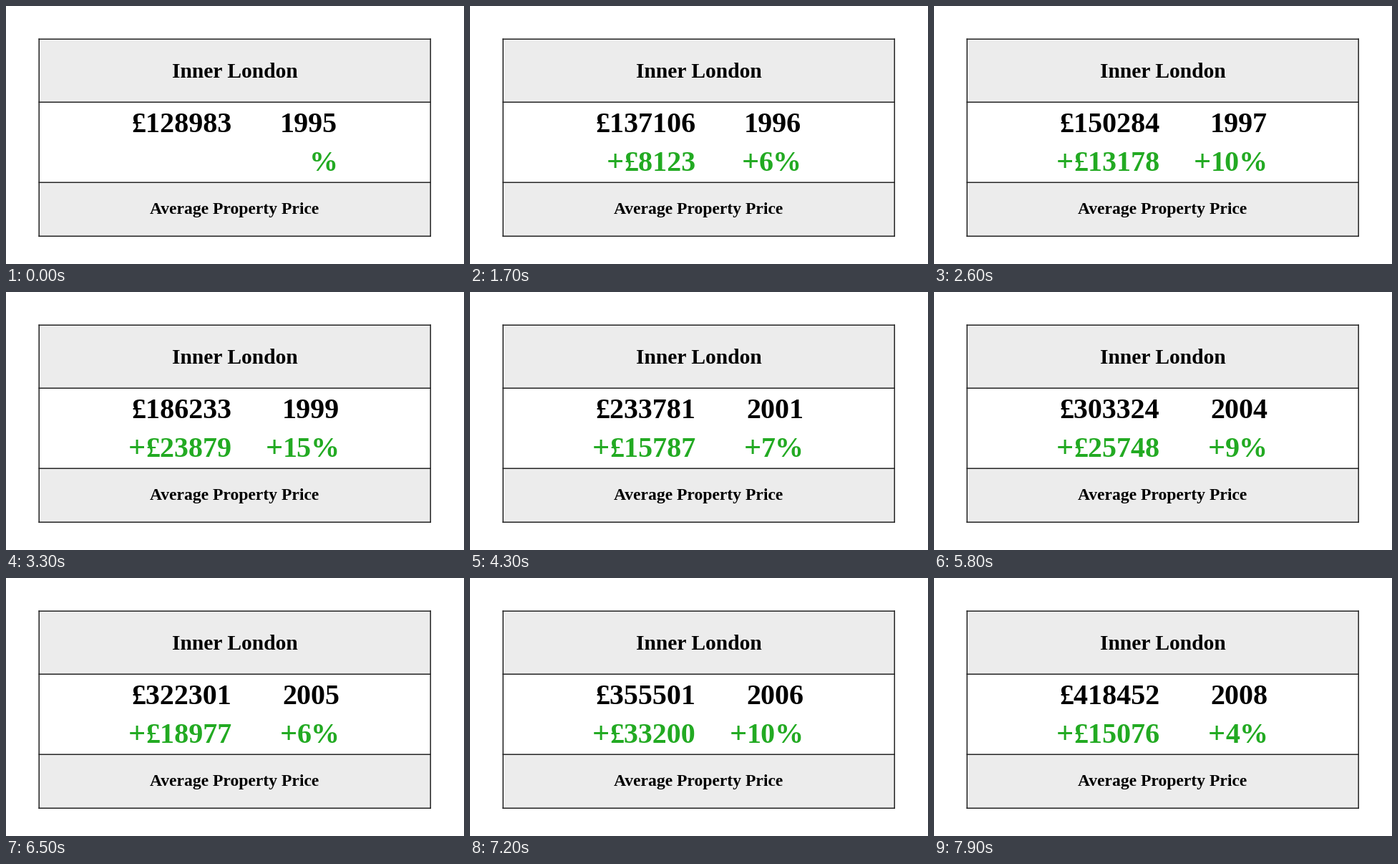
These frames come from a looping animation (640 by 360 pixels, 8000 ms). A matplotlib script:

```python
import matplotlib.pyplot as plt
from matplotlib.animation import FuncAnimation
from matplotlib.patches import Rectangle

W, H = 640, 360
STEP = 100
FRAMES = 80
FIRST_YEAR = 1995
PRICES = [128983, 137106, 150284, 162354, 186233, 217994, 233781,
          259046, 277576, 303324, 322301, 355501, 403376, 418452]
# Time in ms at which each year appears
STARTS = [0, 1700, 2200] + list(range(2800, 7801, 500))

INK, LINE, SHADE, GREEN = "black", "#222222", "#ececec", "#22aa22"
BIG = 40
PLUS_SIZE, PLUS_STEP = 42.5, 24
ROW1, ROW2 = 176, 230
PRICE_RIGHT = 315

plt.rcParams["font.family"] = "Liberation Serif"
plt.rcParams["font.weight"] = "bold"

fig = plt.figure(figsize=(W / 72, H / 72), dpi=72, facecolor="white")
ax = fig.add_axes([0, 0, 1, 1])
ax.set_xlim(0, W)
ax.set_ylim(H, 0)
ax.axis("off")

LEFT, RIGHT = 46.2, 593.2
ROWS = [46.2, 134.2, 246.2, 321.2]
for top, bottom, fill in zip(ROWS, ROWS[1:], (SHADE, "white", SHADE)):
    ax.add_patch(Rectangle((LEFT, top), RIGHT - LEFT, bottom - top,
                           facecolor=fill, edgecolor="none", snap=False))
for y in ROWS:
    ax.plot([LEFT, RIGHT], [y, y], color=LINE, lw=1.5, snap=False,
            solid_capstyle="projecting")
for x in (LEFT, RIGHT):
    ax.plot([x, x], [ROWS[0], ROWS[-1]], color=LINE, lw=1.5, snap=False)

ax.text(320.3, 100, "Inner London", size=29.5, ha="center", color=INK)
ax.text(319.2, 290, "Average Property Price", size=23.6, ha="center",
        color=INK)


def label(y, color, size=BIG):
    return ax.text(0, y, "", size=size, color=color)


price, year = label(ROW1, INK), label(ROW1, INK)
gain, gain_plus = label(ROW2, GREEN), label(ROW2, GREEN, PLUS_SIZE)
rate, rate_plus = label(ROW2, GREEN), label(ROW2, GREEN, PLUS_SIZE)
artists = [price, year, gain, gain_plus, rate, rate_plus]


def advance(text):
    """Width in pixels: digits are half an em, the percent sign a full em."""
    return sum(BIG if c == "%" else BIG / 2 for c in text)


def put(item, text, right, plus=None):
    left = right - advance(text)
    item.set_text(text)
    item.set_x(left)
    if plus:
        plus.set_text("+" if len(text) > 1 else "")
        plus.set_x(left - PLUS_STEP)


def draw(frame):
    t = frame * STEP
    i = sum(s <= t for s in STARTS) - 1
    year_right = 463 if i < 2 else 466
    put(price, f"£{PRICES[i]}", PRICE_RIGHT)
    put(year, str(FIRST_YEAR + i), year_right)
    diff = PRICES[i] - PRICES[i - 1] if i else 0
    put(gain, f"£{diff}" if i else "", PRICE_RIGHT, gain_plus)
    percent = f"{round(100 * diff / PRICES[i - 1])}%" if i else "%"
    put(rate, percent, year_right + 1, rate_plus)
    return artists


anim = FuncAnimation(fig, draw, frames=FRAMES, interval=STEP,
                     repeat=True, repeat_delay=0, blit=False)
plt.show()
```
